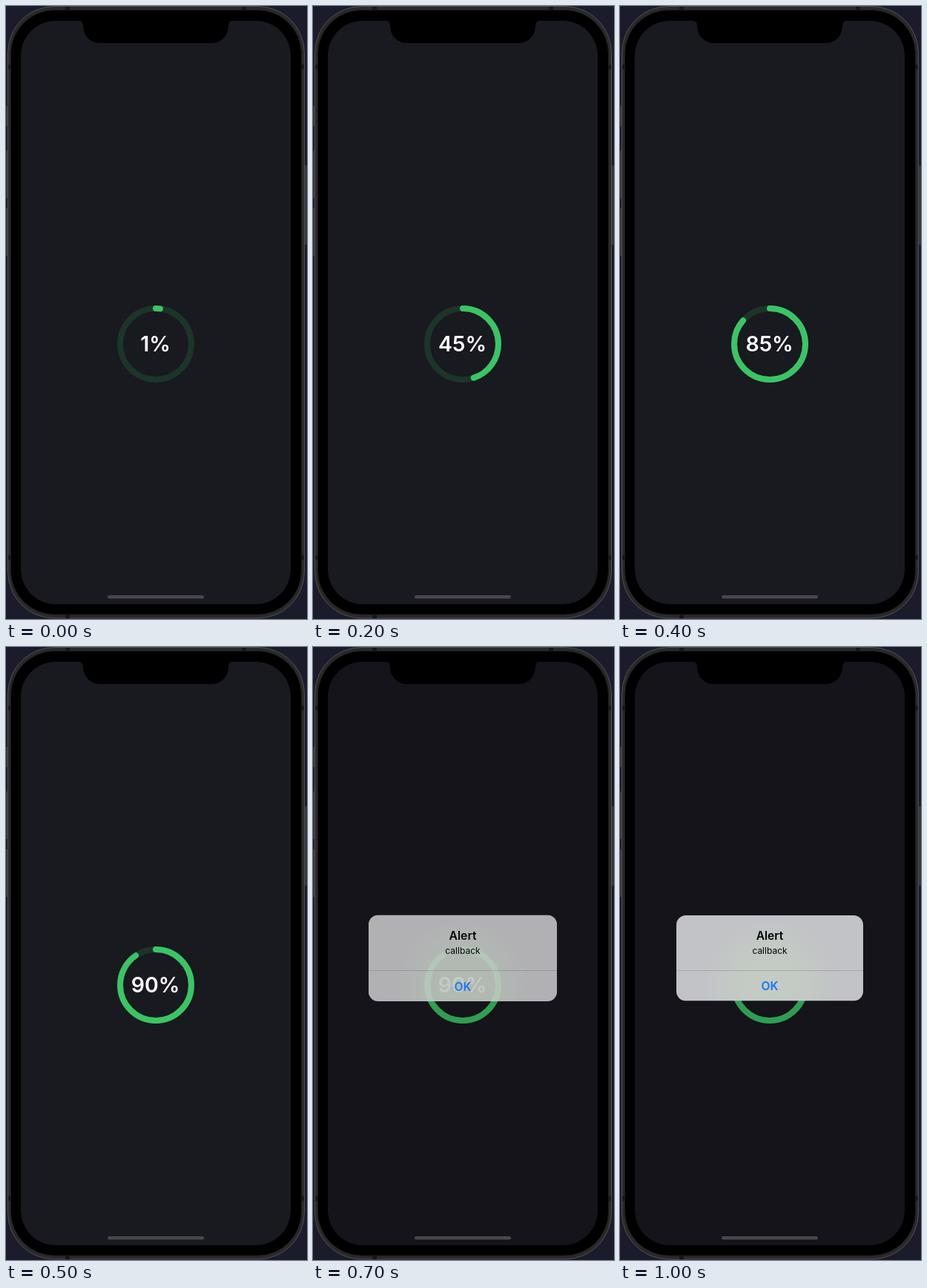
Animation of 406x827 px, one loop 1.2 s. Source, as an HTML page:

```html
<!DOCTYPE html>
<html lang="en">
<head>
<meta charset="utf-8">
<title>Progress ring</title>
<style>
  html, body { margin: 0; width: 100%; height: 100%; overflow: hidden; background: #1c1b2b; }
  svg { display: block; width: 406px; height: 827px; }
  text { font-family: Inter, Roboto, sans-serif; text-anchor: middle; }
  .strong { font-weight: 600; }
</style>
</head>
<body>
<svg viewBox="0 0 406 827">
  <defs>
    <clipPath id="cardClip"><rect x="76" y="362" width="252" height="115.5" rx="13"/></clipPath>
    <radialGradient id="glow" gradientUnits="userSpaceOnUse" cx="202" cy="456" r="88">
      <stop offset="0" stop-color="#c4ccc4"/>
      <stop offset=".55" stop-color="#c3cac4"/>
      <stop offset="1" stop-color="#c2c3c6"/>
    </radialGradient>
  </defs>

  <!-- phone body -->
  <rect width="406" height="827" fill="#1c1b2b"/>
  <g fill="#38383a">
    <rect x="0" y="135" width="3" height="27"/>
    <rect x="0" y="195" width="3" height="64"/>
    <rect x="0" y="273" width="3" height="64"/>
    <rect x="402" y="215" width="4" height="107"/>
  </g>
  <rect x="2.5" y=".5" width="400" height="825.5" rx="63" fill="#29292a" stroke="#515152"/>
  <g fill="#161617">
    <rect x="80" y="1" width="6" height="5"/>
    <rect x="318" y="1" width="6" height="5"/>
    <rect x="80" y="821" width="6" height="5"/>
    <rect x="3" y="79" width="4" height="6"/>
    <rect x="398" y="79" width="4" height="6"/>
    <rect x="3" y="741" width="4" height="6"/>
    <rect x="398" y="741" width="4" height="6"/>
  </g>
  <rect x="6.5" y="5.5" width="392" height="815.5" rx="59" fill="#000" stroke="#1b1b1c"/>

  <!-- screen -->
  <rect x="20" y="20" width="364" height="787" rx="47" fill="#191920"/>
  <g fill="none" stroke-width="8">
    <circle cx="202" cy="456" r="48" stroke="#1b3529"/>
    <circle id="arc" cx="202" cy="456" r="48" stroke="#3ac565" stroke-linecap="round"
      pathLength="100" transform="rotate(-90 202 456)"/>
  </g>
  <text id="label" class="strong" x="201.6" y="466" font-size="28.5" fill="#fff"></text>
  <rect id="dim" x="20" y="20" width="364" height="787" rx="47"/>
  <path d="M98 19.5 Q104 20 104 27 A22 23 0 0 0 126 50 H278 A22 23 0 0 0 300 27 Q300 20 306 19.5 Z"/>
  <rect x="137" y="795" width="130" height="4.5" rx="2.25" fill="#48484b"/>

  <!-- alert -->
  <g id="alert">
    <g id="card" clip-path="url(#cardClip)">
      <rect x="76" y="362" width="252" height="115.5" fill="url(#glow)"/>
      <rect x="76" y="436" width="252" height=".7" fill="#9b9da0"/>
    </g>
    <g id="words">
      <text class="strong" x="202" y="395.4" font-size="15.6">Alert</text>
      <text x="202" y="414" font-size="12">callback</text>
      <text class="strong" x="202" y="463.2" font-size="15.6" fill="#1677f8">OK</text>
    </g>
  </g>
</svg>
<script>
  const LOOP = 1200, STEP = 100;
  const $ = id => document.getElementById(id);

  // [arc length, counter] per step, then the value rests
  const progress = [[2, 1], [18, 15], [45, 45], [73.6, 70], [86.5, 85], [90.5, 90]];

  // [scale, card opacity, text opacity, dim] from the moment the alert opens
  const opening = [
    [1.083, .52, .8, .1],
    [1.009, .9, .97, .195],
    [1.002, .98, 1, .2],
    [1, .995, 1, .2],
    [1, 1, 1, .2]
  ];
  const closed = [1, 0, 0, 0];
  const at = (table, i) => table[Math.min(i, table.length - 1)];

  function draw(time) {
    const step = Math.floor((time % LOOP) / STEP);
    const [arc, count] = at(progress, step);
    const since = step - progress.length;
    const [scale, card, words, dim] = since < 0 ? closed : at(opening, since);

    $("arc").setAttribute("stroke-dasharray", `${arc} 200`);
    $("label").textContent = `${count}%`;
    $("dim").setAttribute("opacity", dim);
    $("card").setAttribute("opacity", card);
    $("words").setAttribute("opacity", words);
    $("alert").setAttribute("transform",
      `translate(202 419.75) scale(${scale}) translate(-202 -419.75)`);
  }

  const start = performance.now();
  function tick() {
    draw(performance.now() - start);
    requestAnimationFrame(tick);
  }
  tick();
</script>
</body>
</html>
```
